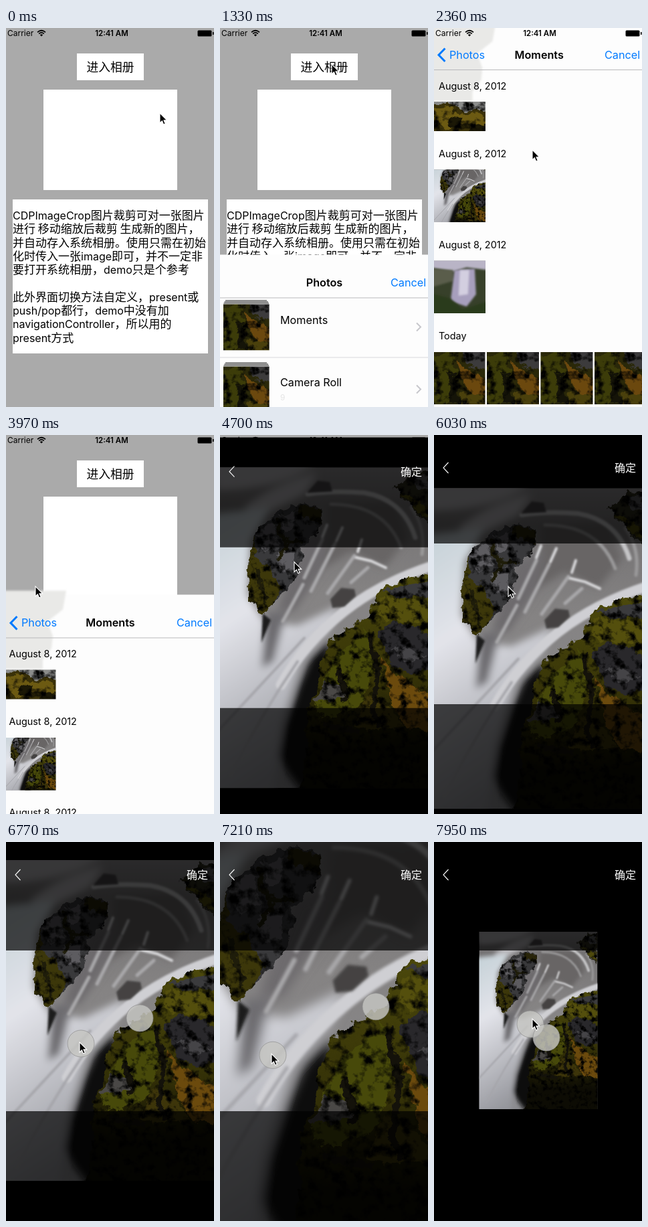
Animation of 311 by 566 pixels, one loop 8000 ms. Source, as an HTML page:

```html
<!DOCTYPE html>
<html lang="zh-CN">
<head>
<meta charset="utf-8">
<style>
html, body { margin: 0; height: 100%; overflow: hidden; background: #aaa; }
svg { display: block; }
#stage { width: 100vw; height: 100vh; }
text { font: 16.2px Inter, "Noto Sans CJK SC", sans-serif; white-space: pre; }
.cjk { font: 17px "Noto Sans CJK SC", sans-serif; }
.cjk tspan { font: 16px Inter, sans-serif; }
.date { font-size: 14.4px; }
.title { font-weight: 600; text-anchor: middle; }
.blue { fill: #007aff; }
.line { fill: none; }
.soft { filter: url(#soft); }
.mist { filter: url(#mist); }
.rough { filter: url(#rough); }
</style>
</head>
<body>
<svg id="stage" viewBox="0 0 311 566">
<defs>
  <filter id="soft"><feGaussianBlur stdDeviation="1.6"/></filter>
  <filter id="mist" x="-20%" y="-20%" width="140%" height="140%"><feGaussianBlur stdDeviation="6"/></filter>
  <!-- Ragged edges and a mottled surface for rock and moss -->
  <filter id="rough" color-interpolation-filters="sRGB">
    <feTurbulence type="fractalNoise" baseFrequency=".07" numOctaves="4" seed="4" result="noise"/>
    <feDisplacementMap in="SourceGraphic" in2="noise" scale="16" xChannelSelector="R" yChannelSelector="G" result="shape"/>
    <feColorMatrix in="noise" values="0 0 3.6 0 -.9  0 0 3.6 0 -.9  0 0 3.6 0 -.9  0 0 0 0 1"/>
    <feComposite in2="shape" operator="arithmetic" k1="1"/>
  </filter>
  <linearGradient id="air" x2="0" y2="1">
    <stop stop-color="#8e8c8f"/><stop offset=".12" stop-color="#747273"/><stop offset=".4" stop-color="#858383"/><stop offset="1" stop-color="#8c8c90"/>
  </linearGradient>
  <linearGradient id="water" x2=".3" y2="1">
    <stop stop-color="#c3d0d6"/><stop offset=".4" stop-color="#e3e4ea"/><stop offset="1" stop-color="#95969c"/>
  </linearGradient>
  <linearGradient id="cliff" x2="0" y2="1">
    <stop stop-color="#4d4a0c"/><stop offset=".5" stop-color="#333007"/><stop offset=".8" stop-color="#0d0c04"/>
  </linearGradient>

  <!-- Waterfall between mossy rocks, 320 x 479 -->
  <svg id="photo" width="320" height="479" viewBox="0 0 320 479">
    <rect width="320" height="479" fill="url(#air)"/>
    <g class="mist">
      <path fill="#b9b8bc" d="M-10 -10H150Q110 30 0 34ZM40 60Q90 20 150 8L130 40L60 75Z"/>
      <path fill="#676565" d="M165 55L265 52L285 105L250 150L200 125L160 150Z"/>
      <path fill="url(#water)" d="M-10 70L80 60L50 110L45 190L72 232L120 236L185 205L165 245L125 290L95 385L85 490H-10Z"/>
      <path fill="#6d6b6d" d="M128 110L170 95L160 150L115 215L90 212Z"/>
      <path fill="#6d6c70" d="M72 218L104 214L84 290L66 300Z"/>
      <path fill="#0b0b0b" d="M168 258L140 284L122 325L102 385L92 430L104 455L130 490H165Z"/>
    </g>
    <g class="line soft" stroke="#c4c4c6" stroke-linecap="round">
      <path stroke-width="7" d="M135 40Q175 34 220 38Q278 48 296 105"/>
      <path stroke-width="5" stroke="#9a999a" d="M170 55Q250 55 275 120M290 60Q312 90 306 130"/>
      <path stroke-width="15" stroke="#cfcfd3" d="M325 146Q245 172 190 215Q130 262 95 325"/>
      <path stroke-width="4" stroke="#dcdcde" d="M164 86L157 104M187 90L178 110M216 108L210 126M205 134L230 140L252 150"/>
      <path stroke-width="5" stroke="#a9a8aa" d="M157 108L130 165M176 114L140 185M205 132L165 188M225 150L200 172M128 175L98 230"/>
      <path stroke-width="4" stroke="#a5a5aa" d="M0 395Q60 330 130 255M20 460Q65 370 120 290"/>
    </g>
    <g class="soft">
      <path fill="#1a1a1a" d="M68 218L66 262L80 228Z"/>
      <path fill="#464446" d="M134 38L150 20L168 22L172 36Z"/>
      <path fill="#454342" d="M169 197L185 180L205 182L207 192L190 208L172 210Z"/>
    </g>
    <g class="rough">
      <path fill="#39393b" d="M52 103L79 75L122 52L154 63L157 85L129 120L122 160L84 205L70 220L49 200L44 165Z"/>
      <path fill="#5d5c60" d="M58 104L84 79L92 112L74 127ZM94 74L118 62L114 88L100 96ZM86 130L118 115L116 150L96 158Z"/>
      <path fill="#3c370a" d="M52 103L58 132L78 152L98 178L84 205L70 220L49 200L44 165Z"/>
      <path fill="#29250a" d="M120 54L154 65L156 84L128 76Z"/>
      <path class="line" stroke="#1f1d0a" stroke-width="6" d="M87 80L100 108L128 112M104 110L90 140M60 150L72 205"/>
      <path fill="#2d2b1b" d="M267 30L290 8L320 3V88L300 72L285 55Z"/>
      <path fill="#4f4a0d" d="M268 30L288 44L320 60V82L296 66Z"/>
      <path fill="#555457" d="M290 14L315 8L318 32L298 34Z"/>
    </g>
    <g class="rough">
      <path fill="url(#cliff)" d="M330 160L290 165L245 180L234 202L220 225L196 240L166 260L152 300L147 335L134 365L132 410L130 450L118 490H330Z"/>
      <path fill="#47490a" d="M160 320L175 285L222 240L235 290L220 350L170 375L144 365Z"/>
      <path fill="#544f0d" d="M240 198L262 192L325 205V240L290 232L255 230L238 220Z"/>
      <path fill="#6b4a0d" d="M246 284L268 308L290 325L325 345V395L285 390L262 355Z"/>
      <path fill="#3d350a" d="M225 340L260 360L280 385L240 395L205 385Z"/>
      <path class="line" stroke="#14120a" stroke-width="8" d="M226 248L240 300L232 360L242 390M180 300L192 350M160 385L215 395"/>
      <path fill="#3b3b3d" d="M248 183L330 167V195L270 193Z"/>
      <path fill="#29282b" d="M240 247L262 232L300 240L330 262V300L285 308L262 295Z"/>
      <path fill="#454447" d="M260 274L285 268L312 280L290 294Z"/>
      <path fill="#4a4846" d="M146 345L162 320L185 330L188 343L160 352Z"/>
    </g>
  </svg>

  <!-- Close-up of moss, 78 x 78 -->
  <svg id="moss" width="78" height="78" viewBox="0 0 78 78">
    <g class="rough">
      <path fill="#2a2809" d="M-12 -12H90V90H-12Z"/>
      <path fill="#3c3c09" d="M0 8L25 0L38 40L22 78H0Z"/>
      <path fill="#3c3b3c" d="M42 -8H90V28L58 24Z"/>
      <path fill="#6b480e" d="M34 14L52 26L78 40V64L60 72L44 44Z"/>
      <path fill="#151408" d="M22 26L34 34L42 78H24Z"/>
      <path fill="#4a400c" d="M44 60L78 68V90H40Z"/>
    </g>
  </svg>

  <path id="more" class="line" stroke="#c7c7cc" stroke-width="2" d="M294 -6L300 0L294 6"/>
  <g id="stack">
    <path stroke="#222" d="M8 -5.5H70M6.5 -3.5H72M5.5 -1.5H73"/>
    <use href="#moss" transform="translate(5) scale(.88)"/>
  </g>
</defs>

<rect width="311" height="566" fill="#aaa"/>
<path fill="#fff" d="M106 38h100v40h-100zM56 92h200v150h-200zM10 256h292v230h-292z"/>
<text class="cjk" x="120.5" y="65" style="font-size:17.8px">进入相册</text>
<g id="notes"></g>

<g id="sheet">
  <rect y="-2" width="311" height="570" fill="#fdfdfd"/>
  <g id="albums">
    <use href="#stack" y="72"/><use href="#stack" y="165"/>
    <text x="90" y="102">Moments</text>
    <text x="90" y="195">Camera Roll</text>
    <text x="90" y="216" style="font-size:12px" fill="#e5e5e5">9</text>
    <use href="#more" y="106"/><use href="#more" y="199"/>
    <path stroke="#d9d9dc" d="M0 151.5H311M0 244.5H311"/>
  </g>
  <g id="moments">
    <rect x="-4" y="63" width="330" height="505" fill="#fdfdfd"/>
    <path class="soft" fill="#e9e9e7" d="M-8 -8H90L85 20L62 38L70 60L68 78L55 95V109H-8Z"/>
    <text class="date" x="4.5" y="91.5">August 8, 2012</text>
    <svg x="-4" y="110" width="78.5" height="44" viewBox="0 0 78 44">
      <g class="rough">
        <path fill="#3a3109" d="M-12 -12H90V56H-12Z"/>
        <path fill="#8b8c8b" d="M-12 -12H90V12L50 14L30 6L-12 2Z"/>
        <path fill="#6c5a12" d="M0 10L22 8L38 20L66 18L78 26V34L44 32L20 40L0 30Z"/>
        <path fill="#1b1806" d="M28 22L44 26L36 38L20 32ZM56 34H90V56H50Z"/>
      </g>
    </svg>
    <text class="date" x="4.5" y="193">August 8, 2012</text>
    <svg x="-4" y="211.5" width="78.5" height="78.5" viewBox="0 80 320 320"><use href="#photo"/></svg>
    <text class="date" x="4.5" y="329">August 8, 2012</text>
    <svg x="-4" y="347.5" width="78.5" height="78.5" viewBox="0 0 78 78">
      <rect width="78" height="78" fill="#37402a"/>
      <path class="soft" fill="#b9b4c6" d="M-4 -4H82V14L50 10L30 16L-4 10Z"/>
      <path class="soft" fill="#5a5d4c" d="M-4 12L30 14V30L-4 40Z"/>
      <path class="soft" fill="#a79fbd" d="M32 14L62 12L64 50L50 68L26 60Z"/>
      <path class="soft" fill="#d3cfe0" d="M40 14L54 14L52 50L38 52Z"/>
      <path class="soft" fill="#2b3a1a" d="M-4 48L26 56L44 72L82 60V82H-4Z"/>
    </svg>
    <text class="date" x="4.5" y="465">Today</text>
    <use href="#moss" x="-4" y="484"/>
    <use href="#moss" x="76.5" y="484"/>
    <use href="#moss" x="157" y="484"/>
    <use href="#moss" x="237.5" y="484"/>
  </g>
  <path stroke="#b9b9bc" d="M0 62.5H311"/>
  <text id="listTitle" class="title" x="156" y="46">Photos</text>
  <g id="back">
    <path class="line" stroke="#007aff" stroke-width="3" d="M16.5 30.5L7 40.2L16.5 50"/>
    <text class="blue" x="23" y="46">Photos</text>
  </g>
  <text id="momentTitle" class="title" x="156" y="46">Moments</text>
  <text class="blue" x="255" y="46">Cancel</text>
</g>

<g id="status">
  <text x="2" y="12.3" style="font-size:12px">Carrier</text>
  <g class="line" stroke="#000" stroke-width="1.7">
    <path d="M47 6.3Q53 1.2 59 6.3M49.2 8.6Q53 5.3 56.8 8.6"/>
    <path fill="#000" stroke="none" d="M50.8 10.2Q53 8.4 55.2 10.2L53 12.6Z"/>
  </g>
  <text class="title" x="158" y="12.3" style="font-size:11.5px">12:41 AM</text>
  <rect x="286.5" y="3.5" width="21" height="9" rx="1.5" fill="#000"/>
  <path d="M309 6h1.5v4h-1.5z"/>
</g>

<g id="crop">
  <rect y="-2" width="311" height="570"/>
  <use id="picture" href="#photo"/>
  <path opacity=".7" d="M0 -2H311V162H0ZM0 402H311V568H0Z"/>
  <path class="line" stroke="#fff" stroke-width="1.1" d="M21.5 41L14 49L21.5 57"/>
  <text class="cjk" x="270" y="55" fill="#fff" style="font-size:16px">确定</text>
</g>

<g id="touches" fill="#c6c6c2" fill-opacity=".82" stroke="#8f8f8f" stroke-opacity=".7">
  <circle id="touchA" r="20"/><circle id="touchB" r="20"/>
</g>
<path id="cursor" stroke="#fff" stroke-width="1.1" d="M0 0V15l3.4-3.2 2.3 5.3 2.5-1.1-2.2-5.1h4.7z"/>
</svg>

<script>
const $ = id => document.getElementById(id);
const move = (id, x, y, more = '') => $(id).setAttribute('transform', `translate(${x} ${y})${more}`);
const show = (id, on) => $(id).setAttribute('visibility', on ? 'visible' : 'hidden');
const fade = (id, a) => $(id).setAttribute('opacity', a);

$('notes').innerHTML = `CDPImageCrop图片裁剪可对一张图片
进行 移动缩放后裁剪 生成新的图片，
并自动存入系统相册。使用只需在初始
化时传入一张image即可，并不一定非
要打开系统相册，demo只是个参考

此外界面切换方法自定义，present或
push/pop都行，demo中没有加
navigationController，所以用的
present方式`.split('\n').map((s, i) =>
  `<text class="cjk" x="10" y="${286 + 20.3 * i}">${s.replace(/[a-z\/]+/gi, '<tspan>$&</tspan>')}</text>`).join('');

// Time is counted in steps; the picture changes once per step.
const LOOP = 8000, STEP = 147.2;

// Keys: [step, value, ...], linear in between
const CURSOR = [[0, 230, 127], [6, 167, 54], [9, 167, 54], [12, 152, 100], [14, 150, 110], [16, 147, 182],
  [21, 46, 232], [22, 44, 226], [29, 44, 226], [32, 111, 189.5], [33, 111, 189.5], [36, 111, 327], [37, 111, 331],
  [43, 111, 174], [45, 111, 290], [46, 110, 299], [50, 66, 322], [53, 128, 277], [54, 147, 264]];
const TOUCH = [[45, 113, 292], [46, 112, 301], [50, 68, 324], [53, 129, 282], [54, 144, 272]];
const CENTER = [[33, 282], [36, 419.5], [37, 423.5], [43, 266.5]];
const ZOOM = [[46, 1], [48, 1.3], [50, 1.5], [52, 1.2], [53, .9], [54, .553]];

function at(keys, k) {
  const i = keys.findIndex(p => p[0] > k);
  if (i < 0) return keys[keys.length - 1].slice(1);
  if (!i) return keys[0].slice(1);
  const [a, b] = [keys[i - 1], keys[i]], u = (k - a[0]) / (b[0] - a[0]);
  return a.slice(1).map((v, j) => v + (b[j + 1] - v) * u);
}

// Critically damped spring: the part of the way still to go
function rest(k, start) {
  const x = 2.65 * Math.max(0, k - start);
  return (1 + x) * Math.exp(-x);
}

function draw(k) {
  show('sheet', k >= 9 && k < 30);
  move('sheet', 0, 568 * (k < 26 ? rest(k, 8.48) : 1 - rest(k, 26.455)));
  const push = rest(k, 13.38);
  move('albums', -96 * (1 - push), 0);
  move('moments', 320 * push, 0);
  show('moments', k >= 14 && k < 30);
  move('listTitle', -106 * (1 - push), 0);
  move('momentTitle', 155 * push, 0);
  fade('listTitle', Math.max(0, 2 * push - 1));
  fade('momentTitle', 1 - push);
  fade('back', 1 - push);

  show('crop', k >= 30);
  move('crop', 0, 568 * rest(k, 29.5));
  move('picture', 156, at(CENTER, k)[0], ` scale(${at(ZOOM, k)[0]}) translate(-160 -239.5)`);

  const [x, y] = at(TOUCH, k);
  show('touches', k >= 45);
  move('touchA', x, y);
  move('touchB', 312 - x, 564 - y);
  move('cursor', ...at(CURSOR, k));
}

let shown;
function tick(now) {
  const k = Math.floor((now % LOOP + 10) / STEP);
  if (k !== shown) draw(shown = k);
  requestAnimationFrame(tick);
}
tick(0);
</script>
</body>
</html>
```
